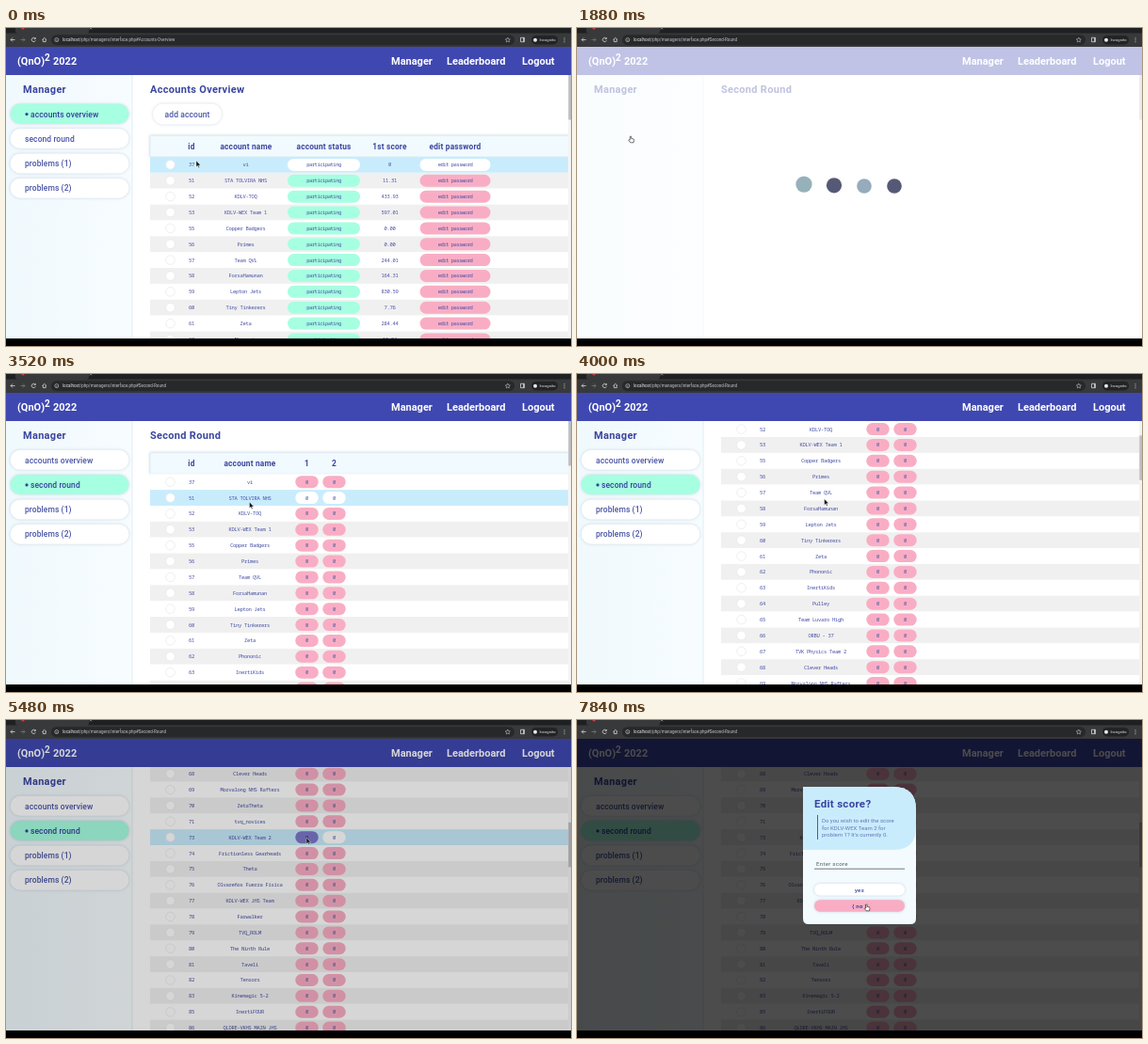
An HTML page for the animation above (7880 ms loop, 600 by 338 pixels).

```html
<!DOCTYPE html>
<html lang="en">
<head>
<meta charset="utf-8">
<title>Accounts manager</title>
<style>
  html, body { margin: 0; width: 100%; height: 100%; overflow: hidden; background: #000; }
  svg { display: block; width: 100vw; height: 100vh; font-family: Roboto, sans-serif; fill: #3a459f; }
  text { white-space: pre; }
  .mid { text-anchor: middle; }
  .h1 { font-size: 11px; font-weight: 700; letter-spacing: .3px; }
  .nav { font-size: 11px; font-weight: 700; fill: #fff; }
  .menu { font-size: 8.5px; font-weight: 500; letter-spacing: .08px; fill: #4a55a6; }
  .active { fill: #34409c; }
  .th { font-size: 8.3px; font-weight: 700; letter-spacing: .2px; text-anchor: middle; }
  .td { font: 500 5.5px "Noto Sans Mono", monospace; letter-spacing: -.3px; text-anchor: middle; fill: #4650a5; }
  .tight { letter-spacing: -.48px; }
  .note { font-size: 6px; fill: #6577b4; }
  .field { font-size: 6.2px; letter-spacing: .25px; fill: #555b66; }
  .choice { font-size: 6px; font-weight: 500; letter-spacing: .3px; text-anchor: middle; }
  .bar { font-size: 4.5px; fill: #e8eaed; }
  .soft { filter: drop-shadow(0 .3px 1.5px #3a608040); }
</style>
</head>
<body>
<script>
const LOOP = 7880, PITCH = 16.87, TOP = 20, BOTTOM = 330;
const CLICK = 850, READY = 1850, ASK = 5400;
const WHITE = '#fff', MINT = '#a6ffe1', PINK = '#f9adc4', SKY = '#c9ecfd', INK = '#3f48b0';

const teams = [
  [37, 'vi', '0'], [51, 'STA TOLVIRA NHS', '11.31'], [52, 'KDLV-TOQ', '433.93'],
  [53, 'KDLV-WEX Team 1', '597.01'], [55, 'Copper Badgers', '0.00'], [56, 'Primes', '0.00'],
  [57, 'Team QVL', '244.01'], [58, 'ForsaHamunan', '164.31'], [59, 'Lepton Jets', '830.59'],
  [60, 'Tiny Tinkerers', '7.76'], [61, 'Zeta', '284.44'], [62, 'Phononic', '19.94'],
  [63, 'InertiKids'], [64, 'Pulley'], [65, 'Team Luvaro High'], [66, 'ORBU - 37'],
  [67, 'TVK Physics Team 2'], [68, 'Clever Heads'], [69, 'Morvalong NHS Rafters'],
  [70, 'ZetaTheta'], [71, 'tvq_novices'], [73, 'KDLV-WEX Team 2'],
  [74, 'Frictionless Gearheads'], [75, 'Theta'], [76, 'Olvareños Fuerza Fisica'],
  [77, 'KDLV-WEX JHS Team'], [78, 'Farwalker'], [79, 'TVQ_ROLM'], [80, 'The Ninth Rule'],
  [81, 'Taveli'], [82, 'Tensors'], [83, 'Kinemagic 5-2'], [85, 'InertiFOUR'],
  [86, 'QLDRE-VKHS MAIN JHS']
];

function el(tag, attrs, parent, text) {
  const node = document.createElementNS('http://www.w3.org/2000/svg', tag);
  set(node, attrs);
  if (text !== undefined) node.textContent = text;
  return parent.appendChild(node);
}
function set(node, attrs) {
  for (const key in attrs) node.setAttribute(key, attrs[key]);
}
const group = (parent, attrs = {}) => el('g', attrs, parent);
const rect = (parent, x, y, width, height, fill, rx = 0, more = {}) =>
  el('rect', { x, y, width, height, fill, rx, ...more }, parent);
const label = (parent, x, y, cls, text) => el('text', { x, y, class: cls }, parent, text);
const path = (parent, d, more = {}) => el('path', { d, ...more }, parent);
const pill = (parent, cx, cy, w, h, fill, more) =>
  rect(parent, cx - w / 2, cy - h / 2, w, h, fill, h / 2, more);
const pageCover = fill => rect(svg, 0, TOP, 600, BOTTOM - TOP, fill);
const show = (node, on) => set(node, { visibility: on ? 'visible' : 'hidden' });

const clamp = v => Math.max(0, Math.min(1, v));
const ramp = (t, start, length) => clamp((t - start) / length);
const smooth = v => v * v * (3 - 2 * v);

// Eased value along keys of [time, ...values].
function track(keys, t) {
  const next = keys.findIndex(k => k[0] > t);
  if (next === 0) return keys[0].slice(1);
  if (next < 0) return keys[keys.length - 1].slice(1);
  const a = keys[next - 1], b = keys[next];
  const p = smooth((t - a[0]) / (b[0] - a[0]));
  return a.slice(1).map((v, i) => v + (b[i + 1] - v) * p);
}

const svg = el('svg', { viewBox: '0 0 600 338', preserveAspectRatio: 'none' }, document.body);
const defs = el('defs', {}, svg);
rect(el('clipPath', { id: 'main' }, defs), 135, 50, 462, BOTTOM - 50, WHITE);
const tint = el('linearGradient', { id: 'tint' }, defs);
el('stop', { offset: 0, 'stop-color': '#f0f9fd' }, tint);
el('stop', { offset: 1, 'stop-color': '#f7fcff' }, tint);

rect(svg, 0, 0, 600, 338, '#000');
pageCover(WHITE);

// Main area
const main = group(svg, { 'clip-path': 'url(#main)' });

function makeTable(rows, rowY, columns, addCells) {
  const root = group(main);
  const head = group(root);
  rect(head, 153, rowY - 31, 446, 22.5, '#f1faff', 1, { class: 'soft', stroke: '#dcebf3', 'stroke-width': .8 });
  columns.forEach(([x, text]) => label(head, x, rowY - 16.8, 'th', text));
  const items = rows.map((team, i) => {
    const g = group(root), y = rowY + i * PITCH;
    const base = i % 2 ? '#f0f0f0' : WHITE;
    const back = rect(g, 153, y - PITCH / 2, 446, PITCH, base);
    el('circle', { cx: 174.5, cy: y, r: 4.8, fill: WHITE, stroke: '#e4e8ea', 'stroke-width': .7 }, g);
    label(g, 197, y + 2, 'td', team[0]);
    return { g, back, base, cells: addCells(g, y, team) };
  });
  return { root, head, items, rowY };
}
function cell(g, x, y, w, fill, text, cls = 'td') {
  const shape = pill(g, x, y, w, 13, fill);
  const caption = label(g, x, y + 2, cls, text);
  return { shape, caption, fill };
}

const title = label(main, 153, 69, 'h1', '');
const accounts = makeTable(teams.slice(0, 12), 145.4,
  [[197, 'id'], [255, 'account name'], [337.5, 'account status'], [407.5, '1st score'], [477, 'edit password']],
  (g, y, [, name, score]) => {
    label(g, 254.5, y + 2, 'td', name);
    label(g, 407.5, y + 2, 'td', score);
    return [cell(g, 337.5, y, 77, MINT, 'participating', 'td tight'),
            cell(g, 477, y, 75, PINK, 'edit password', 'td tight')];
  });
pill(accounts.root, 192.5, 91.5, 73, 22, WHITE, { class: 'soft' });
label(accounts.root, 192.5, 94.6, 'menu mid', 'add account');

const second = makeTable(teams, 114.7,
  [[197, 'id'], [259, 'account name'], [319.5, '1'], [348.5, '2']],
  (g, y, [, name]) => {
    label(g, 259, y + 2, 'td', name);
    return [319.5, 348.5].map(x => cell(g, x, y, 24.5, PINK, '0'));
  });

// Sidebar
rect(svg, 0, 50, 134, BOTTOM - 50, 'url(#tint)');
rect(svg, 133.5, 50, 1, BOTTOM - 50, '#e2eef3');
label(svg, 18, 69, 'h1', 'Manager');
const menuNames = ['accounts overview', 'second round', 'problems (1)', 'problems (2)'];
const menu = menuNames.map((name, i) => {
  const g = group(svg), y = 91.3 + i * 26.3;
  const shape = pill(g, 67.5, y, 126, 21, WHITE, { class: 'soft' });
  const bullet = el('circle', { cx: 22, cy: y + .3, r: 1.6, fill: '#34409c' }, g);
  return { g, shape, bullet, caption: label(g, 20, y + 3.2, 'menu', name) };
});

// Scrollbar
rect(svg, 597, 50, 3, BOTTOM - 50, '#f4f4f4');
const thumb = rect(svg, 597.3, 50, 2.7, 47.5, '#bcbec2');

// Page header
rect(svg, 0, TOP, 600, 30, INK);
label(svg, 12, 39, 'nav', '(QnO)');
label(svg, 41, 35, 'nav', '2').style.fontSize = '10px';
label(svg, 50, 39, 'nav', '2022');
[[409, 'Manager'], [468, 'Leaderboard'], [548, 'Logout']].forEach(([x, text]) => label(svg, x, 39, 'nav', text));

// Loading screen: white veil and dots
const veil = pageCover(WHITE);
const dots = ['#7b9ca8', '#2a2d52', '#7b95aa', '#2a2d52'].map(fill => el('circle', { fill }, svg));

// Dialog
const shade = pageCover('#000');
const dialog = group(svg);
path(dialog, 'M240 71H336Q360 71 360 95V211Q360 217 354 217H246Q240 217 240 211Z', { fill: '#f3fbff' });
path(dialog, 'M240 71H336Q360 71 360 95V114Q360 138 336 138H240Z', { fill: SKY });
label(dialog, 252, 93, 'h1', 'Edit score?').style.fontSize = '11.5px';
rect(dialog, 255, 101, .9, 26, INK);
['Do you wish to edit the score', 'for KDLV-WEX Team 2 for', "problem 1? It's currently 0."]
  .forEach((line, i) => label(dialog, 260, 109.2 + i * 7.3, 'note', line));
label(dialog, 254, 155, 'field', 'Enter score');
rect(dialog, 252, 157.8, 96, .7, '#3b4052');
const choices = [['yes', 180.3, WHITE], ['no', 197.5, PINK]].map(([name, y, fill]) => {
  pill(dialog, 300, y, 96, 12.5, fill, { class: 'soft' });
  return { name, y, caption: label(dialog, 300, y + 2.2, 'choice', name) };
});

// Browser bar
rect(svg, 0, 0, 600, 20, '#1f2022');
rect(svg, 0, 5.5, 600, 14.5, '#38393b');
rect(svg, 10, -4, 78, 10, '#38393b', 3);
el('circle', { cx: 18, cy: 0, r: 1.6, fill: '#d83a3a' }, svg);
pill(svg, 294, 12.7, 492, 11, '#27282a');
const icon = { fill: 'none', stroke: '#d5d7da', 'stroke-width': .8 };
path(svg, 'M9.5 12.5H5M7 10.5L5 12.5L7 14.5', icon);
path(svg, 'M15.5 12.5H20M18 10.5L20 12.5L18 14.5', { ...icon, stroke: '#77797c' });
path(svg, 'M31 11.2A2.1 2.1 0 1 0 31.3 13.2M31.3 10V11.6H29.7', icon);
path(svg, 'M38.5 12.5L40.7 10.4L43 12.5M39.3 12V14.6H42.2V12', icon);
path(svg, 'M51.8 12.6A2 2 0 1 0 55.8 12.6A2 2 0 1 0 51.8 12.6M53.8 12.2V13.8', { ...icon, 'stroke-width': .6 });
path(svg, 'M532.8 10L533.6 11.8L535.4 12L534 13.2L534.4 15L532.8 14L531.2 15L531.6 13.2L530.2 12L532 11.8Z', { ...icon, 'stroke-width': .5 });
path(svg, 'M546.5 10.3H550.5V14.7H546.5ZM549.5 10.3V14.7', icon);
path(svg, 'M88.8 -1L91.2 1.4M91.2 -1L88.8 1.4', { ...icon, 'stroke-width': .5 });
pill(svg, 572, 12.7, 28, 9.5, '#222325');
el('circle', { cx: 562, cy: 12.7, r: 2, fill: '#e8eaed' }, svg);
label(svg, 566.5, 14.2, 'bar', 'Incognito').style.fontSize = '4.1px';
[10.7, 12.7, 14.7].forEach(cy => el('circle', { cx: 593, cy, r: .5, fill: '#e8eaed' }, svg));
const address = label(svg, 60, 14.3, 'bar', '');
el('tspan', {}, address, 'localhost');
const page = el('tspan', { fill: '#c3c6ca' }, address);

// Pointers, both with the tip at 0,0
const arrow = path(svg, 'M0 0V6.6L1.5 5.2L2.6 7.5L3.6 7L2.5 4.9H4.6Z', { fill: '#111', stroke: WHITE, 'stroke-width': .4 });
const hand = path(svg, 'M-.7 .4Q0 -.5 .7 .4V2.5L3 3Q3.7 3.2 3.5 4.2L3 6.8H-.3L-2.2 4.4Q-2 3.3 -.7 4.1Z',
  { fill: WHITE, stroke: '#111', 'stroke-width': .6 });

const pointerKeys = [
  [60, 202, 141], [740, 57, 115], [1880, 57, 115], [2360, 213, 88], [2700, 222, 96],
  [3400, 258.5, 136], [3600, 258.5, 136], [4350, 266, 130], [4850, 266, 130],
  [5250, 319, 125], [5850, 319, 125], [6700, 303, 160], [7400, 307.5, 196]
];
const scrollKeys = [[3680, 0], [4080, 100], [4480, 219.4], [4900, 344.3]];

function drawTable(table, x, y, scroll, hoverable) {
  table.root.setAttribute('transform', `translate(0 ${-scroll})`);
  const hovered = hoverable && x > 153 && y > 50
    ? Math.floor((y + scroll - table.rowY) / PITCH + .5) : -1;
  table.items.forEach(({ back, base, cells }, i) => {
    const over = i === hovered;
    set(back, { fill: over ? SKY : base });
    cells.forEach(({ shape, caption, fill }) => {
      const left = +shape.getAttribute('x'), width = +shape.getAttribute('width');
      const pressed = over && x > left && x < left + width;
      set(shape, { fill: pressed ? '#7d77c9' : over ? WHITE : fill });
      caption.style.fill = pressed ? '#2a2f80' : '';
    });
  });
}

function draw(t) {
  const moved = t >= CLICK;
  const [x, y] = track(pointerKeys, t);
  const [scroll] = track(scrollKeys, t);

  page.textContent = '/php/managers/interface.php#' + (moved ? 'Second-Round' : 'Accounts-Overview');
  title.textContent = moved ? 'Second Round' : 'Accounts Overview';
  set(title, { transform: `translate(0 ${-scroll})` });
  show(accounts.root, !moved);
  show(second.root, t >= READY);
  if (!moved) drawTable(accounts, x, y, 0, true);
  else drawTable(second, x, y, scroll, t > 2800 && t < 5560 && (t < 3680 || t > 4920));
  set(second.head, { opacity: ramp(t, 2050, 250) });
  second.items.forEach(({ g }, i) => set(g, { opacity: ramp(t, 2342 + i * 45, 300) }));

  menu.forEach(({ g, shape, bullet, caption }, i) => {
    const active = i === +moved;
    const shown = moved ? ramp(t, 1960 + i * 90, 240) : 1;
    set(g, { opacity: shown, transform: `translate(${-4 * (1 - shown)} 0)` });
    set(shape, { fill: active ? MINT : WHITE });
    set(bullet, { opacity: +active });
    set(caption, { x: active ? 26 : 20, class: active ? 'menu active' : 'menu' });
  });
  set(thumb, { y: 50 + scroll * .171 });

  const leaving = 1 - ramp(t, READY, 150);
  set(veil, { opacity: .8 * ramp(t, CLICK, 200) * (1 - ramp(t, READY, 200)) });
  dots.forEach((dot, i) => {
    const shown = ramp(t, 940 + i * 55, 150);
    const lift = Math.max(0, Math.cos((t - 1120) / 150 - (i - 1) * 1.5));
    set(dot, {
      cx: 241 + i * 32 - 4 * (1 - shown), cy: 168 - 2 * lift + 6 * (1 - shown),
      r: 7.8 + .9 * lift, opacity: shown * leaving
    });
  });

  set(shade, { opacity: .7 * ramp(t, ASK, 350) });
  const opened = smooth(ramp(t, 5500, 260));
  set(dialog, { opacity: opened, transform: `translate(0 ${-8 * (1 - opened)})` });
  let overChoice = false;
  choices.forEach(({ name, y: cy, caption }) => {
    const over = t > 5800 && Math.abs(y - cy) < 6.2;
    overChoice = overChoice || over;
    caption.textContent = over ? `{ ${name} }` : name;
    caption.style.fontWeight = over ? 700 : '';
  });

  const overMenu = x < 131 && y > 81 && t < READY + 100;
  const pointing = overChoice || overMenu;
  show(hand, pointing);
  show(arrow, !pointing);
  set(pointing ? hand : arrow, { transform: `translate(${x} ${y})` });
}

const start = performance.now();
function tick() {
  draw((performance.now() - start) % LOOP);
  requestAnimationFrame(tick);
}
tick();
</script>
</body>
</html>
```
